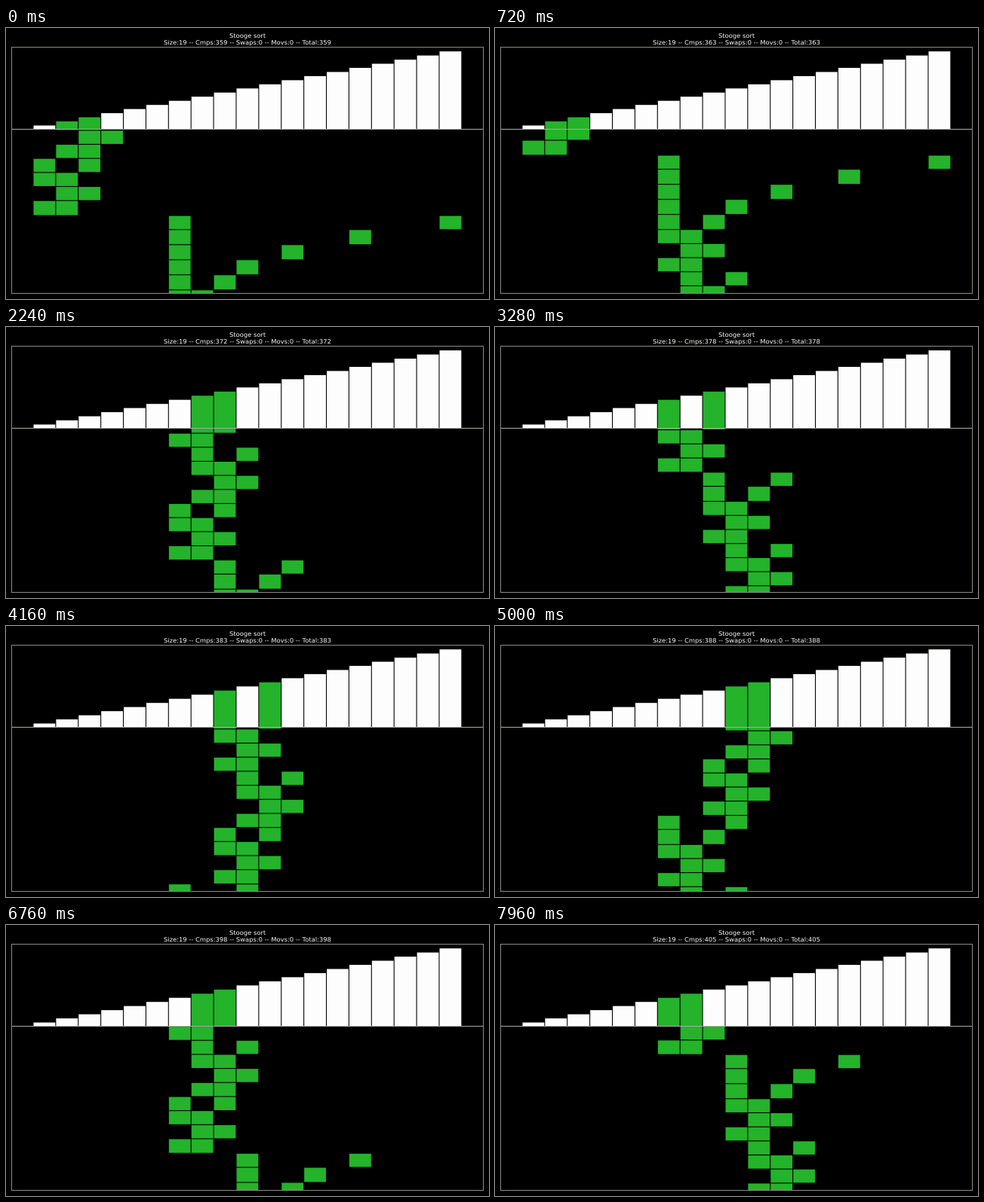
A matplotlib script for the animation above (8000 ms loop, 640x360 px).

```python
import math

import matplotlib.pyplot as plt
from matplotlib.animation import FuncAnimation
from matplotlib.patches import Rectangle

W, H, DPI = 640, 360, 100
FRAMES, INTERVAL = 200, 40
N = 19
LEFT, PITCH, BAR_W = 36.5, 29.89, 28.8
LINE_Y, FLOOR_Y = 135, 352
BAR_STEP = 5.47
TICK_RATE, TICK_PHASE = 30, 0.7   # the scroll advances 30 times a second
TICK_PX = 3.6435
ROW, CHAIN, RETURN, GAP = 18.68, 1.33, 0.3, 1.1
FIRST, FIRST_Y = 360, 136.4
LABEL_LAG = 7
WHITE, GREEN = "#fdfdfd", "#24b32a"
EDGE, RULE = "#8c8c86", "#acaca6"


def stooge(lo, hi, depth=0):
    """Yield each compared pair of an already sorted list, with its depth."""
    yield lo, hi, depth
    size = hi - lo + 1
    if size > 2:
        t = size // 3
        yield from stooge(lo, hi - t, depth + 1)
        yield from stooge(lo + t, hi, depth + 1)
        yield from stooge(lo, hi - t, depth + 1)


def row_tops(calls):
    tops = [0.0]
    for k in range(1, len(calls)):
        gap = ROW + RETURN * max(0, calls[k - 1][2] - calls[k][2] - 1)
        if k > 1 and calls[k][0] == calls[k - 1][0] == calls[k - 2][0]:
            gap += CHAIN
        tops.append(tops[-1] + gap)
    shift = FIRST_Y - tops[FIRST - 1]
    return [y + shift for y in tops]


calls = list(stooge(0, N - 1))
tops = row_tops(calls)

plt.rcParams["font.family"] = "DejaVu Sans"
plt.rcParams["text.hinting"] = "none"
fig = plt.figure(figsize=(W / DPI, H / DPI), dpi=DPI, facecolor="black")
ax = fig.add_axes([0, 0, 1, 1])
ax.set_xlim(0, W)
ax.set_ylim(H, 0)
ax.axis("off")


def rect(x, y, w, h, color, z=1):
    return ax.add_patch(Rectangle((x, y), w, h, fc=color, lw=0, zorder=z, snap=False))


def frame(x0, y0, x1, y1, color):
    for y in (y0, y1 - 1):
        rect(x0, y, x1 - x0, 1, color, 3)
    for x in (x0, x1 - 1):
        rect(x, y0 + 1, 1, y1 - y0 - 2, color, 3)


bars = [rect(LEFT + i * PITCH, LINE_Y - BAR_STEP * (i + 1), BAR_W,
             BAR_STEP * (i + 1), WHITE) for i in range(N)]

window = Rectangle((0, LINE_Y), W, FLOOR_Y - LINE_Y, transform=ax.transData)
blocks = [rect(0, 0, BAR_W, 0, GREEN) for _ in range(30)]
for b in blocks:
    b.set_clip_path(window)

frame(7, 25, 633, 353, EDGE)
rect(8, 134, 624, 1, RULE, 4)

ax.text(W / 2, 13, "Stooge sort", color="white", size=6, ha="center")
status = ax.text(W / 2, 21, "", color="white", size=6, ha="center")


def update(n):
    tick = math.floor(n * INTERVAL * TICK_RATE / 1000 + TICK_PHASE)
    scroll = TICK_PX * tick
    active = max(k for k, y in enumerate(tops) if y - scroll < LINE_Y - 0.5)
    done = active + (tops[active] - scroll < LINE_Y - LABEL_LAG)

    for i, bar in enumerate(bars):
        bar.set_facecolor(GREEN if i in calls[active][:2] else WHITE)

    for j, block in enumerate(blocks):
        k = active + j // 2
        block.set_xy((LEFT + calls[k][j % 2] * PITCH, tops[k] - scroll))
        block.set_height(tops[k + 1] - tops[k] - GAP)

    status.set_text(f"Size:{N} -- Cmps:{done} -- Swaps:0 -- Movs:0 -- Total:{done}")
    return bars + blocks + [status]


anim = FuncAnimation(fig, update, frames=FRAMES, interval=INTERVAL,
                     init_func=lambda: update(0), repeat=True, repeat_delay=0)
plt.show()
```
